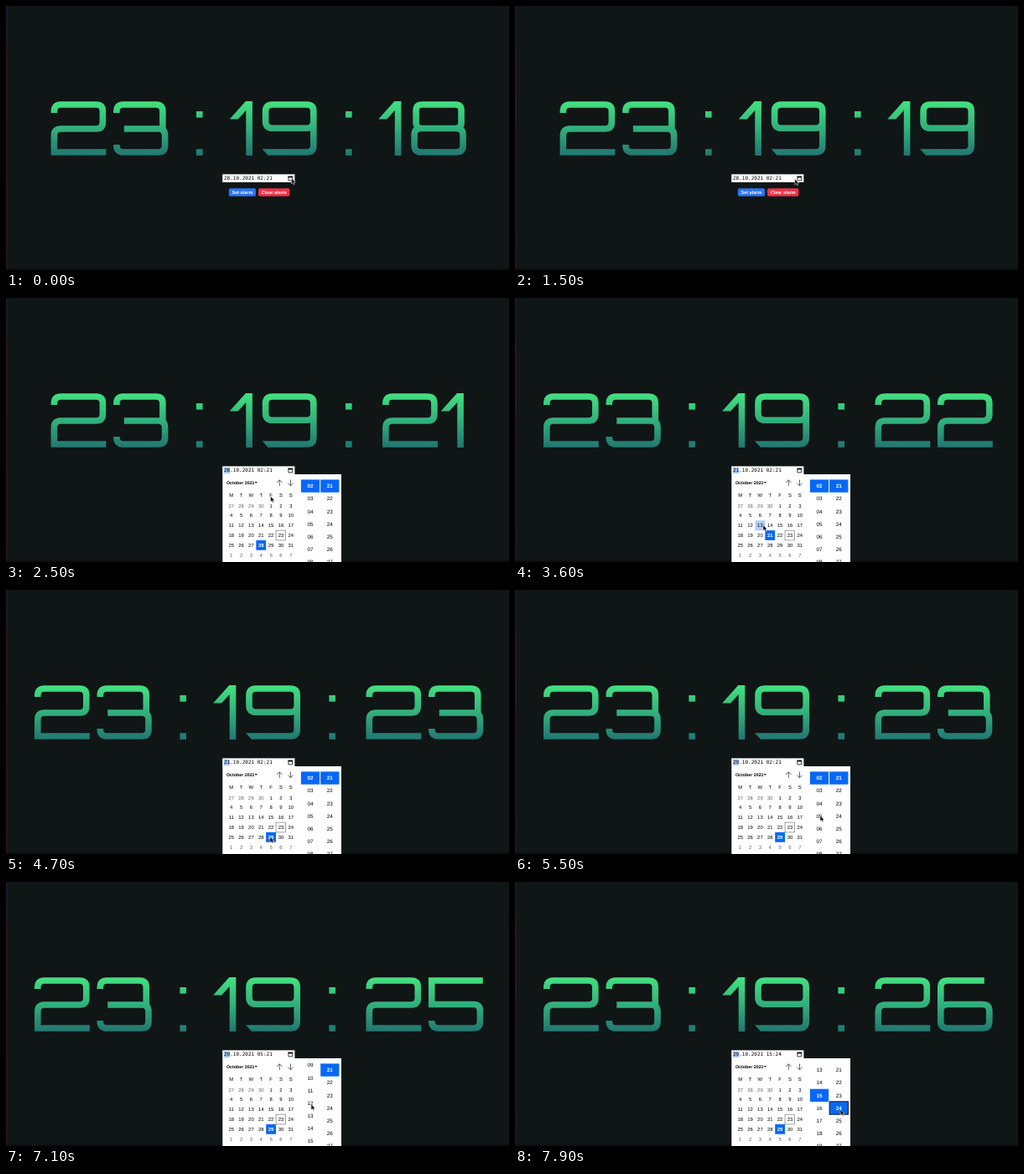
Recreate the animation shown at these times as an HTML page. Size 600 px wide and 316 px high, loop 8000 ms.

```html
<!DOCTYPE html>
<html lang="en">
<head>
<meta charset="utf-8">
<title>Alarm clock</title>
<style>
html, body { margin: 0; width: 100%; height: 100%; overflow: hidden; background: #101616; }
svg { display: block; width: 100vw; height: 100vh; }
text { font-family: "Liberation Sans", Arial, sans-serif; font-size: 5.9px; text-anchor: middle; text-rendering: geometricPrecision; }
.mono { font-family: "DejaVu Sans Mono", "Liberation Mono", monospace; font-size: 6px; text-anchor: start; white-space: pre; }
.bold { font-weight: 700; }
.small { font-size: 5.5px; }
.title { font-size: 5.3px; text-anchor: start; }
.time { font-size: 6.3px; }
</style>
</head>
<body>
<svg id="stage" viewBox="0 0 600 316" preserveAspectRatio="none">
  <defs>
    <linearGradient id="ink" gradientUnits="userSpaceOnUse" x1="0" y1="0" x2="0" y2="65">
      <stop offset="0" stop-color="#42e27f"/>
      <stop offset=".5" stop-color="#32b07c"/>
      <stop offset="1" stop-color="#217671"/>
    </linearGradient>
    <linearGradient id="edge" x1="0" y1="0" x2="0" y2="1">
      <stop offset="0" stop-color="#1c1c30"/>
      <stop offset=".14" stop-color="#1d1a2b"/>
      <stop offset=".18" stop-color="#371420"/>
      <stop offset="1" stop-color="#2b131c"/>
    </linearGradient>
    <clipPath id="list"><rect x="350" y="216.5" width="50" height="100"/></clipPath>
  </defs>
  <rect width="600" height="316" fill="#101616"/>
  <rect width="1.5" height="316" fill="url(#edge)"/>
  <rect y="314.5" width="600" height="1.5" fill="#0b0d0f"/>
  <g id="clock" stroke-width="7.6" stroke-miterlimit="8"></g>
  <g id="form"></g>
  <g id="popup"></g>
  <path id="pointer" d="M0,0V6.8L1.6,5.4L2.7,7.8L3.8,7.3L2.8,5H4.8Z" fill="#000" stroke="#fff" stroke-width=".5"/>
</svg>
<script>
const LOOP = 8000;
const BLUE = "#0768f5";
const $ = id => document.getElementById(id);

function add(parent, tag, attrs, text) {
  const node = document.createElementNS("http://www.w3.org/2000/svg", tag);
  set(node, attrs);
  if (text !== undefined) node.textContent = text;
  parent.appendChild(node);
  return node;
}
function set(node, attrs) {
  for (const key in attrs) node.setAttribute(key, attrs[key]);
}
const rect = (parent, x, y, width, height, fill, more) =>
  add(parent, "rect", { x, y, width, height, fill, ...more });
const label = (parent, x, y, text, fill = "#000", cls = "") =>
  add(parent, "text", { x, y, fill, class: cls }, text);
const show = (node, on) => node.setAttribute("visibility", on ? "inherit" : "hidden");

// Digit shapes in a 66 x 65 box: s = stroked line, f = filled shape
const ring = (l, t, r, b, q = 8) =>
  `M${l + q},${t}H${r - q}Q${r},${t} ${r},${t + q}V${b - q}Q${r},${b} ${r - q},${b}H${l + q}Q${l},${b} ${l},${b - q}V${t + q}Q${l},${t} ${l + q},${t}Z`;
const bowl = "V53Q61.7,61 53.7,61H12Q4,61 4,53V52";
const GLYPHS = {
  0: { s: ring(4, 4, 62, 61), f: "M7,45L59,11V20L7,54Z" },
  1: { f: "M.8,21.5L20,0H28V65H20.4V11L10.8,21.5Z", left: -5.5, adv: 34.2 },
  2: { s: "M4,14V12Q4,4 12,4H54Q62,4 62,12V25Q62,33 54,33H12Q4,33 4,41V61H66" },
  3: { s: "M4,14V12Q4,4 12,4H51Q59,4 59,12V33M13,33H53.7Q61.7,33 61.7,41" + bowl },
  4: { f: "M0,41.2L44,0H52.5V41.2H63V48.7H52.5V65H45V48.7H0ZM45,9.6V41.2H11Z", left: -4.5 },
  5: { s: "M65,4H4V32.5H53.7Q61.7,32.5 61.7,40.5" + bowl },
  6: { s: "M56,4H12Q4,4 4,12V40" + ring(4, 32.5, 62, 61) },
  8: { s: ring(6, 4, 60, 32.5, 7) + ring(4, 32.5, 62, 61) },
  9: { s: ring(4, 4, 61.2, 32.3) + "M61.2,24V53Q61.2,61 53.2,61H7", f: "M0,57.2H8V64.8H7Z" }
};
const STEP = 74.5;

function drawGlyph(parent, digit, x) {
  const shape = GLYPHS[digit];
  const g = add(parent, "g", { transform: `translate(${x + (shape.left || 0)},0)` });
  if (shape.s) add(g, "path", { d: shape.s, fill: "none", stroke: "url(#ink)" });
  if (shape.f) add(g, "path", { d: shape.f, fill: "url(#ink)", "fill-rule": "evenodd" });
}
function drawPair(parent, pair, x) {
  drawGlyph(parent, pair[0], x);
  drawGlyph(parent, pair[1], x + (GLYPHS[pair[0]].adv || STEP));
}
function drawClock(second) {
  const clock = $("clock");
  const pair = String(second);
  const narrow = pair.includes("1");
  const left = narrow ? 53.4 : pair[1] === "4" ? 38.4 : 33.8;
  clock.textContent = "";
  clock.setAttribute("transform", `translate(${left},114)`);
  drawPair(clock, "23", 0);
  drawPair(clock, "19", 218);
  drawPair(clock, pair, 395.5);
  for (const x of [173.6, 351.6])
    for (const y of [12, 57.3]) rect(clock, x, y, 7.6, 7.6, "url(#ink)");
}

// Date field and buttons
const form = $("form");
rect(form, 258.2, 201.4, 86.2, 9.6, "#fff");
const mark = rect(form, 259.7, 203, 7.5, 7, "#a5c7f7");
const field = label(form, 260, 208.2, "", "#000", "mono");
add(form, "path", { d: "M336.9,204.4H341.6V208.9H336.9Z", fill: "none", stroke: "#111", "stroke-width": .8 });
rect(form, 336.5, 203.6, 5.5, 1.9, "#111");
const buttons = add(form, "g", {});
function button(x, w, fill, text) {
  rect(buttons, x, 218.2, w, 9.6, fill, { rx: 1.8 });
  label(buttons, x + w / 2, 224.9, text, "#fff", "bold small");
}
button(265.8, 32.2, "#2f74f0", "Set alarm");
button(301, 37.4, "#ec3349", "Clear alarm");

// Calendar
const popup = $("popup");
const CELL = 11.85;
const colX = c => 268.7 + c * CELL;
const rowY = r => 248.5 + r * CELL;
const cellOf = day => [(day + 3) % 7, Math.floor((day + 3) / 7)];
function place(box, day) {
  const [c, r] = cellOf(day);
  set(box, { x: colX(c) - 5.9, y: rowY(r) - 5.9 });
}
rect(popup, 258.3, 211, 141.7, 105, "#fff");
label(popup, 263, 222.6, "October 2021", "#000", "bold title");
add(popup, "path", { d: "M296.6,219.9H299.8L298.2,222Z", fill: "#111" });
add(popup, "path", {
  d: "M326.3,225V217.8M323.2,221L326.3,217.8L329.4,221M339.5,217.6V224.8M336.4,221.6L339.5,224.8L342.6,221.6",
  fill: "none", stroke: "#333", "stroke-width": .75
});
const hover = rect(popup, 0, 0, 11.8, 11.8, "#aecdf6");
const today = rect(popup, 0, 0, 11.4, 11.8, "none", { stroke: "#666", "stroke-width": .6 });
const picked = rect(popup, 0, 0, 11.8, 11.8, BLUE);
place(today, 23);
[..."MTWTFSS"].forEach((d, c) => label(popup, colX(c), 238.4, d));
const days = {};
for (let day = -3; day <= 38; day++) {
  const [c, r] = cellOf(day);
  const inside = day > 0 && day < 32;
  const n = day < 1 ? day + 30 : day > 31 ? day - 31 : day;
  days[day] = label(popup, colX(c), rowY(r) + 2, n, inside ? "#000" : "#606060");
}

// Hour and minute lists
const ROW = 15.15;
const lists = add(popup, "g", { "clip-path": "url(#list)" });
function makeList(x, from, to, textOf) {
  const g = add(lists, "g", {});
  const box = rect(g, x - 11.1, 0, 22.2, 15.3, BLUE);
  const items = [];
  for (let k = from; k <= to; k++)
    items.push({ k, node: label(g, x, 227.3 + k * ROW, textOf(k), "#000", "time") });
  return (chosen, scroll, focus) => {
    g.setAttribute("transform", `translate(0,${-scroll * ROW})`);
    set(box, { y: 217.4 + chosen * ROW, stroke: focus ? "#101c33" : "none", "stroke-width": 1.1 });
    for (const { k, node } of items) paint(node, k === chosen, "time");
  };
}
function paint(node, on, cls = "") {
  set(node, { fill: on ? "#fff" : "#000", class: on ? cls + " bold" : cls });
}
const pad = n => String(n).padStart(2, "0");
const setHours = makeList(363, -5, 20, k => pad((k + 26) % 24));
const setMinutes = makeList(386.3, 0, 7, k => 21 + k);

// Motion: rows of [time, ...values]
const PATH = [
  [0, 340.5, 206], [150, 340, 207], [500, 322, 229], [900, 320, 227], [1200, 325, 219],
  [1500, 333.7, 207], [1800, 338.5, 206], [2050, 338.5, 206], [2500, 315.6, 237.3],
  [2900, 305, 283], [3250, 304.5, 283], [3600, 296, 271.8], [3950, 300, 290],
  [4200, 310, 303], [4500, 315, 295.5], [4850, 315, 295.5], [5350, 364, 270],
  [5700, 364, 270], [6200, 364, 266.5], [7250, 364, 266], [7400, 364, 256],
  [7550, 364, 256], [7800, 388, 272], [8000, 388.3, 272.3]
];
const SCROLL = [[0, 0], [5750, 0], [6250, -2.93], [6400, -2.93], [6850, 5], [6950, 5], [7300, 11], [8000, 11]];
const TICKS = [600, 1600, 2500, 3500, 4600, 5600, 6600, 7600];

function track(rows, t) {
  const i = Math.max(1, rows.findIndex(row => row[0] >= t));
  const a = rows[i - 1], b = rows[i];
  const p = (t - a[0]) / (b[0] - a[0]);
  const e = p * p * (3 - 2 * p);
  return a.slice(1).map((v, j) => v + (b[j + 1] - v) * e);
}

let shown = 0;
function render(t) {
  const second = 18 + TICKS.filter(at => t >= at).length;
  if (second !== shown) drawClock(shown = second);

  const open = t >= 2000;
  const day = t < 3100 ? 28 : t < 4700 ? 21 : 29;
  const typed = t >= 4700 && t < 4800 ? 21 : day;
  const hour = t < 5600 ? 2 : t < 7500 ? 5 : 15;
  const minute = t < 7900 ? 21 : 24;
  field.textContent = `${typed}.10.2021 ${pad(hour)}:${minute}`;
  show(mark, open);
  show(popup, open);
  show(buttons, !open);

  const [x, y] = track(PATH, t);
  $("pointer").setAttribute("transform", `translate(${x},${y})`);
  place(picked, day);
  for (let d = 1; d < 32; d++) paint(days[d], d === day);

  const c = Math.floor((x - colX(0) + 5.9) / CELL);
  const r = Math.floor((y - rowY(0) + 5.9) / CELL);
  const over = r * 7 + c - 3;
  const onDay = c >= 0 && c < 7 && r >= 0 && r < 6 && over > 0 && over < 32;
  show(hover, open && onDay);
  if (onDay) place(hover, over);

  setHours(hour - 2, track(SCROLL, t)[0], t >= 5600 && t < 7900);
  setMinutes(minute - 21, 0, t >= 7900);
}

const begin = performance.now();
function frame() {
  render((performance.now() - begin) % LOOP);
  requestAnimationFrame(frame);
}
render(0);
requestAnimationFrame(frame);
</script>
</body>
</html>
```
